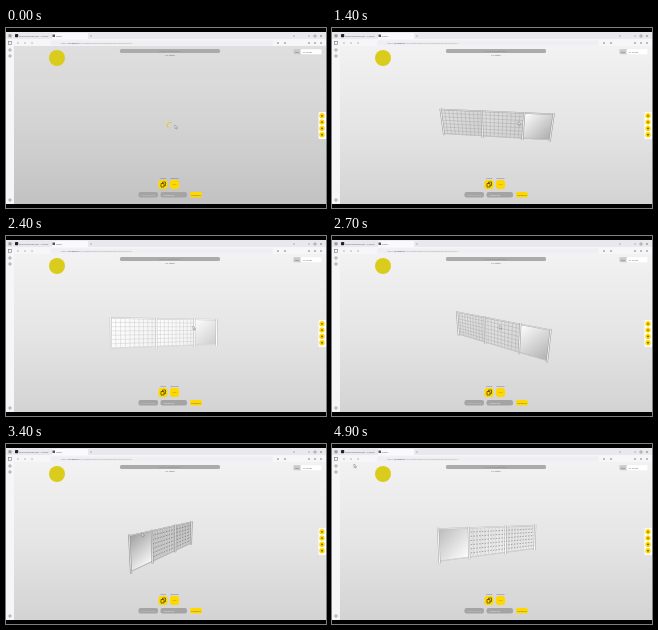
Write an HTML page with a canvas that moves like this. It is 320x180 px and loops after 5000 ms.

```html
<!DOCTYPE html>
<html lang="en">
<head>
<meta charset="utf-8">
<title>Fence configurator</title>
<style>
  html, body { margin: 0; width: 100%; height: 100%; overflow: hidden; background: #000; }
  svg, canvas { position: absolute; left: 0; top: 0; width: 320px; height: 180px; }
  text { font: 2.5px Arial, "Liberation Sans", sans-serif; fill: #666; }
  .mid { text-anchor: middle; }
</style>
</head>
<body>
<svg viewBox="0 0 320 180">
  <defs>
    <linearGradient id="page" x2="0" y2="1">
      <stop stop-color="#f2f2f2"/><stop offset=".5" stop-color="#e5e5e5"/><stop offset="1" stop-color="#d3d3d3"/>
    </linearGradient>
  </defs>
  <!-- browser window -->
  <rect y="4" width="320" height="172" fill="#f6f6f8"/>
  <rect y="4" width="320" height="7" fill="#e9e9ed"/>
  <rect x="46" y="5" width="36" height="6" rx="1" fill="#fafafc"/>
  <rect x="2.500" y="6.300" width="3" height="3" fill="#999"/>
  <rect x="9" y="6" width="3.200" height="3.200" rx=".7" fill="#222"/>
  <text x="13" y="8.800">project/dashboard - Previe</text>
  <rect x="46.500" y="6.500" width="2.500" height="2.500" fill="#555"/>
  <text x="50" y="8.800">editor</text>
  <path d="M84 8h2M287 8h2M302 8h2M308 7h2v2h-2zM314 7l2 2m0-2l-2 2M11 15h2M18 15h2M25 15h2" stroke="#777" stroke-width=".5" fill="none"/>
  <rect x="45" y="12.500" width="222" height="5" rx="1" fill="#efeff3"/>
  <text x="55" y="16" style="fill:#999">https://<tspan fill="#444">localhost</tspan>:5173/editor/demo/project/template-tab-panel/1/1</text>
  <path d="M271 15h2M278 15h2M302 15h2M308 15h2M314 15h2" stroke="#777" stroke-width=".9"/>
  <g fill="none" stroke="#777" stroke-width=".6">
    <rect x="2.500" y="13.500" width="3" height="3"/>
    <circle cx="4" cy="22" r="1.200"/><circle cx="4" cy="28" r="1.200"/><circle cx="4" cy="172" r="1.200"/>
  </g>
  <!-- page -->
  <rect x="8" y="18" width="312" height="158" fill="url(#page)"/>
  <rect id="veil" x="8" y="18" width="312" height="158"/>
  <circle cx="51" cy="30" r="8" fill="#d9cc1c"/>
  <rect x="114" y="21" width="100" height="4" rx="1.500" fill="#ababab"/>
  <text class="mid" x="164" y="23.900" style="fill:#888">Panel configuration</text>
  <text class="mid" x="164" y="28">10 steps</text>
  <rect x="287.500" y="21.300" width="8" height="5" rx="1" fill="#c9c9c9"/>
  <text x="288.800" y="24.800">Tag</text>
  <rect x="294.500" y="21.300" width="21" height="5" rx="1" fill="#fff"/>
  <text x="296.500" y="24.800">21 styles</text>
  <rect x="312.500" y="84" width="8" height="27" rx="1.500" fill="#fff"/>
  <g fill="#ffd800">
    <circle cx="316" cy="87.800" r="2.700"/><circle cx="316" cy="94.100" r="2.700"/>
    <circle cx="316" cy="100.400" r="2.700"/><circle cx="316" cy="106.700" r="2.700"/>
    <rect x="152.500" y="152" width="9" height="9" rx="2.500"/><rect x="164" y="152" width="9" height="9" rx="2.500"/>
    <rect x="184" y="164" width="12" height="5.500" rx="2"/>
  </g>
  <g fill="#6b5d00">
    <circle cx="316" cy="87.800" r=".9"/><circle cx="316" cy="94.100" r=".9"/>
    <circle cx="316" cy="100.400" r=".9"/><circle cx="316" cy="106.700" r=".9"/>
  </g>
  <path d="M155 155.500h3v3.500h-3zM156.500 155.500v-1.500h3v3.500h-1.500" fill="none" stroke="#443c00" stroke-width=".7"/>
  <path d="M166.500 156.500h4" stroke="#c9a500" stroke-width=".6"/>
  <text class="mid" x="157" y="151.300">colors</text>
  <text class="mid" x="168.500" y="151.300">dimens</text>
  <g fill="#a4a4a4">
    <rect x="132.500" y="164" width="19.500" height="5.500" rx="2"/><rect x="154.500" y="164" width="26.500" height="5.500" rx="2"/>
  </g>
  <text class="mid" x="142.300" y="167.600" style="fill:#ccc">Configuration</text>
  <text class="mid" x="163" y="167.600" style="fill:#eee">Measures</text>
  <text class="mid" x="190" y="167.600">Continue</text>
</svg>
<canvas id="view" width="320" height="180"></canvas>
<script>
const ctx = document.getElementById('view').getContext('2d');
const veil = document.getElementById('veil');
const LOOP = 5000, STEP = 100, DISTANCE = 170, HALF = 15;
const POSTS = [-55, -13, 28, 55];

// time, yaw, pitch (degrees), brightness
const ORBIT = [
  [1100, 44, 33, .76], [1800, -42, 12, .9], [2400, -18, 2, .95], [2600, 18, 14, .88],
  [2900, 75, 30, .75], [3000, 92, 35, .68], [3100, 109, 25, .7], [3500, 125, 8, .8],
  [3800, 140, 4, .87], [4100, 148, 8, .88]
];
// time, x, y
const POINTER = [
  [1100, 169, 97], [1800, 209, 89], [2400, 187, 90], [3100, 141, 89], [3800, 129, 89],
  [4100, 132, 90], [4200, 132, 90], [4800, 35, 33], [4900, 22, 20]
];

function sample(keys, t) {
  const next = keys.findIndex(k => k[0] > t);
  if (next === 0) return keys[0].slice(1);
  if (next < 0) return keys[keys.length - 1].slice(1);
  const a = keys[next - 1], b = keys[next], u = (t - a[0]) / (b[0] - a[0]);
  return a.slice(1).map((v, i) => v + (b[i + 1] - v) * u);
}

const gray = v => {
  const n = Math.round(255 * Math.min(1, Math.max(0, v)));
  return `rgb(${n},${n},${n})`;
};

function line(a, b, color, width) {
  ctx.strokeStyle = color;
  ctx.lineWidth = width;
  ctx.beginPath();
  ctx.moveTo(...a);
  ctx.lineTo(...b);
  ctx.stroke();
}

// A pale bar with a shaded edge
function bar(a, b, light, width) {
  line(a, b, gray(light - .22), width);
  line(a, b, gray(light + .1), width * .5);
}

function drawFence(t) {
  const [yaw, pitch, light] = sample(ORBIT, t);
  const p = yaw * Math.PI / 180, e = pitch * Math.PI / 180;
  const behind = yaw > 90;
  const project = (s, y) => {
    const z = s * Math.sin(p);
    const k = DISTANCE / (DISTANCE - z * Math.cos(e) - y * Math.sin(e));
    return [163 + s * Math.cos(p) * k, 97 - (y * Math.cos(e) - z * Math.sin(e)) * k];
  };

  for (let i = 0; i < 3; i++) {
    const l = POSTS[i], r = POSTS[i + 1], solid = i === 2;
    const corners = [project(l, HALF - 1), project(r, HALF - 1), project(r, 2 - HALF), project(l, 2 - HALF)];
    const [from, to] = behind ? [corners[3], corners[1]] : [corners[0], corners[2]];
    const fill = ctx.createLinearGradient(...from, ...to);
    fill.addColorStop(0, gray(light + (solid ? .2 : .06)));
    fill.addColorStop(1, gray(light - (solid ? .15 : 0)));
    ctx.fillStyle = fill;
    ctx.beginPath();
    corners.forEach(c => ctx.lineTo(...c));
    ctx.fill();
    if (!solid) {
      const mesh = gray(light - (behind ? .25 : .17));
      for (let c = 1; c < 10; c++) {
        const s = l + (r - l) * c / 10;
        line(project(s, HALF - 1), project(s, 2 - HALF), mesh, behind ? .25 : .45);
      }
      if (behind) ctx.setLineDash([1.4, 1.4]);
      for (let row = 1; row < 7; row++) {
        const y = HALF - 1 - row * 27 / 7;
        line(project(l, y), project(r, y), mesh, behind ? 1 : .45);
      }
      ctx.setLineDash([]);
    }
    bar(corners[3], corners[2], light, .9);
    bar(corners[0], corners[1], light, 1.4);
  }
  for (const s of POSTS) bar(project(s, HALF), project(s, -HALF), light, 2);
}

function drawSpinner(t) {
  ctx.strokeStyle = '#f0c400';
  ctx.lineWidth = .9;
  ctx.beginPath();
  const start = 2.4 + t / 160;
  ctx.arc(164.5, 97.5, 3.2, start, start + 2.6);
  ctx.stroke();
}

function drawPointer(t) {
  const [x, y] = sample(POINTER, t);
  ctx.beginPath();
  [[0, 0], [0, 3.6], [.9, 2.8], [1.6, 4.2], [2.1, 3.9], [1.5, 2.6], [2.6, 2.5]]
    .forEach(([dx, dy]) => ctx.lineTo(x + dx, y + dy));
  ctx.closePath();
  ctx.fillStyle = '#fff';
  ctx.fill();
  ctx.strokeStyle = '#777';
  ctx.lineWidth = .5;
  ctx.stroke();
}

function render(now) {
  const t = Math.floor(now % LOOP / STEP) * STEP;
  ctx.clearRect(0, 0, 320, 180);
  veil.setAttribute('opacity', .08 * Math.max(0, 1 - t / 600));
  if (t < 300) drawSpinner(t);
  else drawFence(t);
  drawPointer(t);
}

const begin = performance.now();
function tick() {
  render(performance.now() - begin);
  requestAnimationFrame(tick);
}
tick();
</script>
</body>
</html>
```
